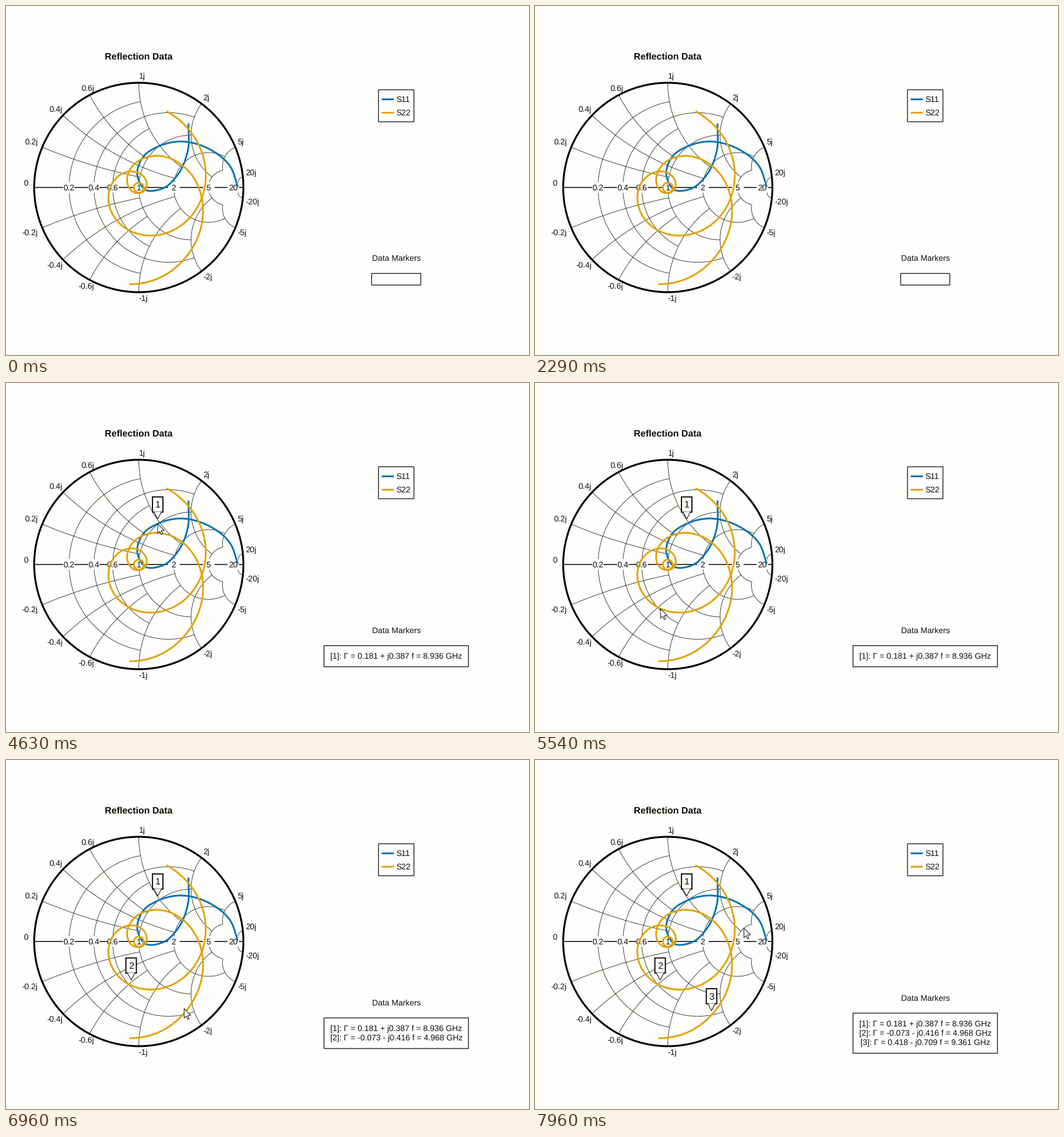
These frames come from a looping animation (900x600 px, 8000 ms). A matplotlib script:

```python
import numpy as np
import matplotlib.pyplot as plt
from matplotlib.animation import FuncAnimation
from matplotlib.patches import Circle, Polygon, Rectangle

plt.rcParams["font.family"] = ["Liberation Sans", "DejaVu Sans"]
plt.rcParams["text.hinting"] = "none"

W, H, DPI = 900, 600, 100
PX = 72 / DPI
STEP, FRAMES = 40, 200
BG, INK, GRID = "#fefefc", "#0c0c08", "#222218"
BLUE, ORANGE = "#0072b2", "#e3a202"
CX, CY, R = 228.5, 312, 180

fig = plt.figure(figsize=(W / DPI, H / DPI), dpi=DPI, facecolor=BG)
ax = fig.add_axes([0, 0, 1, 1])
ax.set_xlim(0, W)
ax.set_ylim(H, 0)
ax.axis("off")


def label(x, y, s, size=14, ha="center", z=5, **kw):
    """Text whose capitals are centred vertically on y."""
    return ax.text(x, y + 0.345 * size, s, size=size * PX, ha=ha,
                   va="baseline", color=INK, zorder=z, **kw)


def stroke(x, y, color, width, z):
    ax.plot(x, y, color=color, lw=width * PX, zorder=z, solid_capstyle="butt")


def box(x, y, w, h, z=4, lw=1.3):
    return ax.add_patch(Rectangle((x, y), w, h, fc=BG, ec=INK, lw=lw * PX,
                                  snap=False, joinstyle="miter", zorder=z))


def to_stage(gamma):
    return CX + R * gamma.real, CY - R * gamma.imag


def reflection(z):
    return (z - 1) / (z + 1)


# Chart grid: each value with the crossing value where its arcs stop
LIMITS = {0.2: 1, 0.4: 2, 0.6: 1, 1: 2, 2: 5, 5: 5, 20: 20}
stroke([CX - R, CX + R], [CY, CY], INK, 1.6, 1)
for value, limit in LIMITS.items():
    sweep = np.tan(np.linspace(0, np.arctan(limit), 150))
    for sign in (1, -1):
        for z in (value + 1j * sign * sweep, sweep + 1j * sign * value):
            stroke(*to_stage(reflection(z)), GRID, 0.85, 1)
    x, _ = to_stage(reflection(complex(value)))
    ax.add_patch(Rectangle((x - 10, CY - 9), 20, 18, fc=BG, ec="none", zorder=2))
    label(x, CY + 0.5, f"{value:g}", z=3)
ax.add_patch(Circle((CX, CY), R, fill=False, ec="black", lw=3.2 * PX, zorder=3))


def rim_label(value, sign):
    g = reflection(1j * sign * value)
    x, y = to_stage(g)
    left_half = g.real < -0.01
    x += 24.5 + 35 * g.real if left_half else 4.5 * g.real
    y -= 0.75 + sign * (7 + 4.3 * abs(g.imag))
    text = f"{sign * value:g}j" if value else "0"
    label(x, y, text, ha="right" if left_half else "left")


rim_label(0, 1)
for value in LIMITS:
    rim_label(value, 1)
    rim_label(value, -1)
label(CX, 86.5, "Reflection Data", 16, weight="bold")


def smooth_path(points, n=500):
    """Cubic Hermite curve through the points, spaced by chord length."""
    p = np.array(points, float)
    t = np.r_[0, np.cumsum(np.hypot(*np.diff(p, axis=0).T))]
    m = np.gradient(p, t, axis=0)
    s = np.linspace(0, t[-1], n)
    i = np.clip(np.searchsorted(t, s) - 1, 0, len(t) - 2)
    h = (t[i + 1] - t[i])[:, None]
    u = (s - t[i])[:, None] / h
    return ((2 * u**3 - 3 * u**2 + 1) * p[i] + (u**3 - 2 * u**2 + u) * h * m[i]
            + (3 * u**2 - 2 * u**3) * p[i + 1] + (u**3 - u**2) * h * m[i + 1]).T


def ramp(x, slope, width):
    """Zero for negative x, a straight rise after it, with a soft knee."""
    return slope * width * np.logaddexp(0, x / width)


S11 = [(314, 202), (313, 248), (297, 288), (270, 313.5), (240, 316),
       (226, 291), (237, 258), (262, 241.5), (297, 233), (348, 245),
       (386, 276), (399, 311)]
stroke(*smooth_path(S11), BLUE, 3, 4)

# S22 spirals clockwise into the match point and out again
turn = np.linspace(-70, 1175.6, 1200)
radius = (8.2 + ramp(280 - turn, 0.375, 57) + ramp(turn - 962, 0.78, 47)
          - ramp(turn - 1160, 0.5, 6))
stroke(*to_stage(radius / R * np.exp(-1j * np.radians(turn))), ORANGE, 3, 4)

# Legend
box(641, 144, 61, 55)
for name, y, color in (("S11", 160, BLUE), ("S22", 183, ORANGE)):
    stroke([646, 667], [y, y], color, 3, 5)
    label(671, y, name, ha="left")

# Call-outs and their list: time of the click, reflection, frequency
LIST_X, LIST_Y, LINE = 671.5, 469.7, 16.3
CLICKS = [(4600, 0.181 + 0.387j, 8.936),
          (6120, -0.073 - 0.416j, 4.968),
          (7360, 0.418 - 0.709j, 9.361)]


def callout(k, g):
    x, y = to_stage(g)
    y -= 8.5
    flag = box(x - 9, y - 38, 18, 26, z=6, lw=2)
    tail = Polygon([(x - 6.5, y - 12.5), (x, y), (x + 6.5, y - 12.5)],
                   closed=False, fc=BG, ec=INK, lw=1.1 * PX, zorder=7)
    return flag, ax.add_patch(tail), label(x, y - 25, str(k), 16, z=8)


callouts, rows = [], []
for k, (_, g, freq) in enumerate(CLICKS, 1):
    callouts.append(callout(k, g))
    sign = "-" if g.imag < 0 else "+"
    rows.append(label(LIST_X, 0, f"[{k}]: Γ = {g.real:.3f} {sign} "
                                 f"j{abs(g.imag):.3f} f = {freq:.3f} GHz"))
heading = label(LIST_X, 0, "Data Markers")
panel = box(0, 0, 1, 1)

# Pointer moves: start, end, destination
ENTRY = np.array([300, 285])
MOVES = [(2800, 2960, (261, 242)), (4720, 5200, (216, 388)),
         (6200, 6400, (309, 413.5)), (6440, 7160, (306, 430.5)),
         (7520, 7960, (359.5, 289))]
ARROW = np.array([(0, 0), (0, 16.5), (3.8, 13), (6.3, 18.7), (8.7, 17.6),
                  (6.2, 12), (11.4, 11.7)])
pointer = ax.add_patch(Polygon(ARROW, fc="white", ec=INK, lw=PX, zorder=9))


def pointer_at(t):
    pos = ENTRY
    for start, end, goal in MOVES:
        u = np.clip((t - start) / (end - start), 0, 1)
        pos = pos + u * u * (3 - 2 * u) * (np.array(goal) - pos)
    return pos


def update(frame):
    t = frame * STEP
    n = sum(t >= click[0] for click in CLICKS)
    for k, parts in enumerate(callouts):
        for part in (*parts, rows[k]):
            part.set_visible(k < n)
        rows[k].set_y(LIST_Y - 0.5 + LINE * (k - (n - 1) / 2) + 0.345 * 14)
    w, h = (248.5 if n else 84.5), 20 + LINE * n
    panel.set_bounds(LIST_X - w / 2, LIST_Y - h / 2, w, h)
    heading.set_y(433.4 - LINE / 2 * n + 0.345 * 14)
    pointer.set_visible(t >= MOVES[0][0])
    pointer.set_xy(ARROW + pointer_at(t))
    return []


anim = FuncAnimation(fig, update, frames=FRAMES, interval=STEP,
                     repeat=True, repeat_delay=0, blit=False)
plt.show()
```
